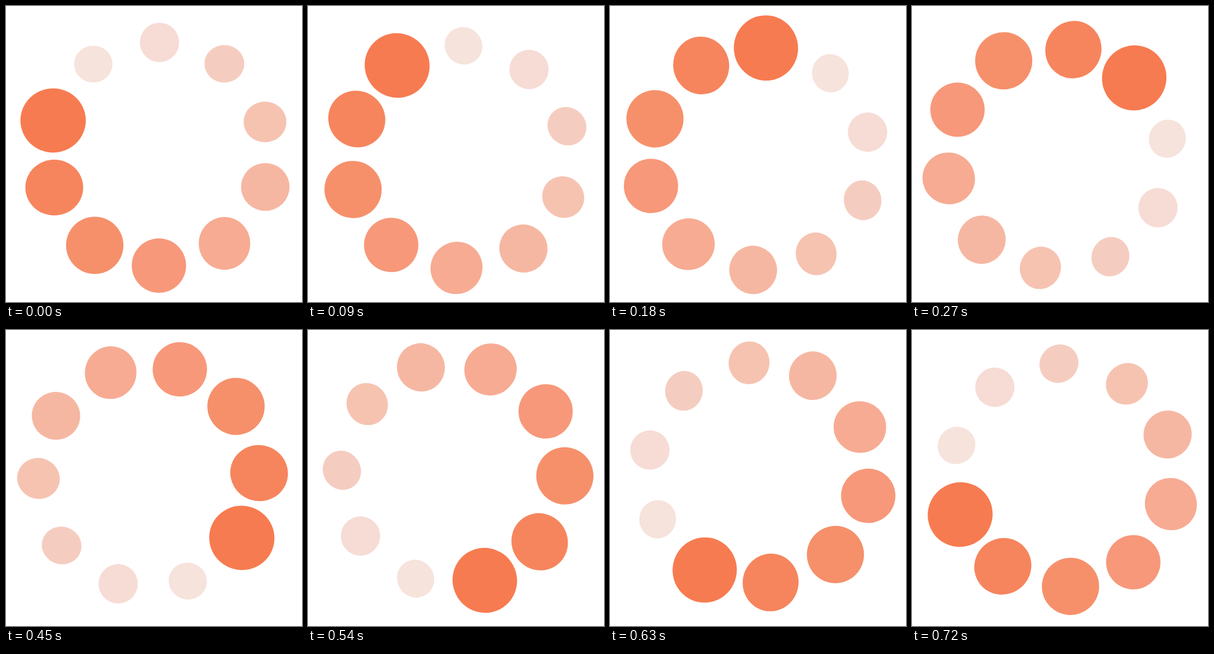
An HTML page that plays this animation: 512x512 px, repeating every 810 ms.

```html
<!DOCTYPE html>
<html lang="en">
<head>
<meta charset="utf-8">
<title>Loading ring</title>
<style>
  html, body { margin: 0; width: 100%; height: 100%; overflow: hidden; background: #fff; }
  svg { display: block; width: 100%; height: 100%; }
</style>
</head>
<body>
<svg viewBox="-256 -256 512 512"><g id="ring"></g></svg>
<script>
  const STEP_MS = 90;
  // Rotation held during each step, in degrees
  const ANGLES = [0, 38, 75.9, 115.9, 155.9, 195.9, 235.9, 281.7, 321.5];

  // x, y, horizontal radius, vertical radius, colour
  const DISCS = [
    [-174.5, -58, 56.5, 55.5, '#f77b50'],
    [-172.5, 58, 50, 48.3, '#f6855d'],
    [-102.5, 158, 49.6, 49.4, '#f6906b'],
    [8.5, 193, 47, 47, '#f7987a'],
    [122, 154.7, 44.6, 45.6, '#f7ab93'],
    [192.5, 57, 42, 41.3, '#f6b7a2'],
    [192, -55.5, 37, 35.3, '#f6c3b1'],
    [121.7, -156, 34.5, 32.5, '#f5cdc0'],
    [9.5, -193, 34, 34, '#f6dcd5'],
    [-105, -155.5, 33.2, 31.8, '#f6e3dc']
  ];

  const ring = document.getElementById('ring');
  ring.innerHTML = DISCS.map(([x, y, rx, ry, fill]) =>
    `<ellipse cx="${x}" cy="${y}" rx="${rx}" ry="${ry}" fill="${fill}"/>`).join('');

  const start = performance.now();
  function draw() {
    const step = Math.floor((performance.now() - start) / STEP_MS) % ANGLES.length;
    ring.setAttribute('transform', `rotate(${ANGLES[step]})`);
    requestAnimationFrame(draw);
  }
  draw();
</script>
</body>
</html>
```
